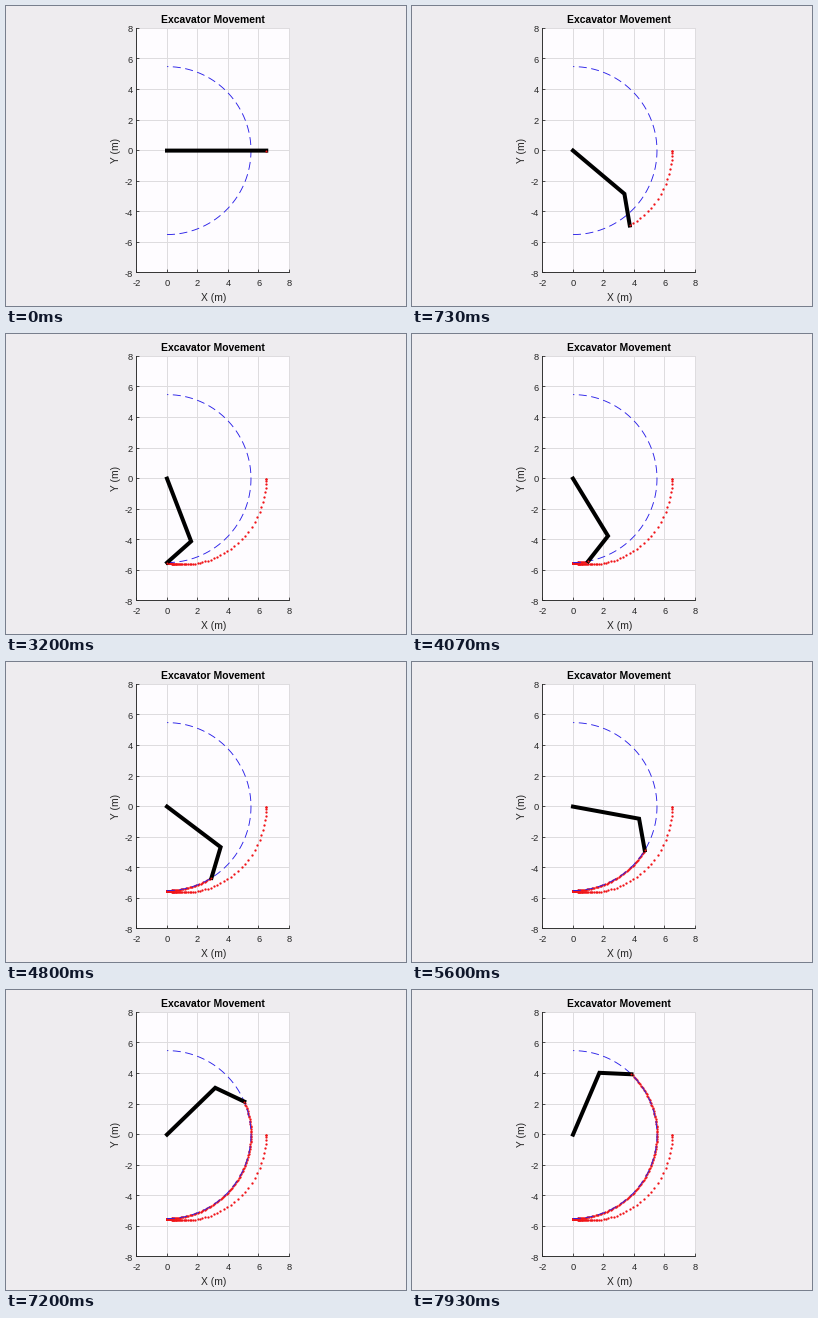
Write a matplotlib script that moves like this. It is 400 px wide and 300 px high and loops after 8000 ms.

```python
import numpy as np
import matplotlib.pyplot as plt
from matplotlib.animation import FuncAnimation

W, H, DPI = 400, 300, 100
FRAMES, LOOP_MS = 120, 8000
PT = 72 / DPI                       # points per pixel
SCALE, OX, OY = 15.27, 161, 144.6   # pixels per metre, origin on stage

BOOM, STICK, RADIUS = 4.4, 2.1, 5.5
RATE = 0.195                        # critically damped response, per frame
TRACE = 48                          # start of the arc, in frames
TURN = np.radians(2.275)            # arc speed, per frame
INK, GRID = "#262626", "#dedcdf"

# Joint angles that put the tip at the lower end of the arc
BEND = -np.arccos((RADIUS**2 - BOOM**2 - STICK**2) / (2 * BOOM * STICK))
LEAD = np.arctan2(-STICK * np.sin(BEND), BOOM + STICK * np.cos(BEND))
LOW = -np.pi / 2 + LEAD


def px(x, y):
    return OX + SCALE * np.asarray(x), OY - SCALE * np.asarray(y)


def crisp(x, y):
    """Like px, but on pixel centres."""
    return [np.floor(v) + 0.5 for v in px(x, y)]


def step(t):
    x = RATE * np.maximum(t, 0)
    return 1 - (1 + x) * np.exp(-x)


def ramp(t):
    x = RATE * np.maximum(t, 0)
    return (x - 2 + (2 + x) * np.exp(-x)) / RATE


def pose(t):
    """Elbow and tip position in metres at time t (in frames)."""
    s = step(t)
    a = LOW * s + TURN * ramp(t - TRACE)
    b = a + BEND * s
    ex, ey = BOOM * np.cos(a), BOOM * np.sin(a)
    return ex, ey, ex + STICK * np.cos(b), ey + STICK * np.sin(b)


fig = plt.figure(figsize=(W / DPI, H / DPI), dpi=DPI, facecolor="#eeecef")
ax = fig.add_axes([0, 0, 1, 1])
ax.set_xlim(0, W)
ax.set_ylim(H, 0)
ax.axis("off")


def line(x, y, color, width, **kw):
    return ax.plot(x, y, color=color, lw=width * PT, snap=False, **kw)[0]


def label(x, y, text, size, **kw):
    kw = {"ha": "center", "va": "center", "color": INK, **kw}
    ax.text(x, y, text, fontsize=size * PT, family="Liberation Sans", **kw)


def draw_axes():
    left, top = crisp(-2, 8)
    right, bottom = crisp(8, -8)
    ax.fill([left, right, right, left], [top, top, bottom, bottom],
            color="#fefcff", lw=0)
    for v in range(-2, 9, 2):
        x = crisp(v, 0)[0]
        line([x, x], [top, bottom], GRID, 1)
        line([x, x], [bottom, bottom - 2.5], INK, 0.8)
        label(px(v, 0)[0], 278, str(v), 9.3)
    for v in range(-8, 9, 2):
        y = crisp(0, v)[1]
        line([left, right], [y, y], GRID, 1)
        line([left, left + 2.5], [y, y], INK, 0.8)
        label(126.5, px(0, v)[1] + 0.4, str(v), 9.3,
              ha="right", va="center_baseline")
    line([left, left, right], [top, bottom, bottom], INK, 0.9)
    label(207.3, 14, "Excavator Movement", 10.4, weight="bold", color="black")
    label(207.3, 292, "X (m)", 10.3)
    label(109.6, 144, "Y (m)", 10.3, rotation=90)


draw_axes()
arm = line([], [], "black", 4, solid_capstyle="projecting",
           solid_joinstyle="miter")
trail = line([], [], "#f01418", 0, ls="none", marker="o",
             ms=2.3 * PT, mew=0)
arc = np.linspace(-np.pi / 2, np.pi / 2, 200)
path = line(*px(RADIUS * np.cos(arc), RADIUS * np.sin(arc)), "#2a20e8", 0.9,
            dash_capstyle="butt", zorder=3)
path.set_linestyle((0, (8 / 0.9, 4.5 / 0.9)))
arm.set_zorder(4)
trail.set_zorder(2.5)
tip = line([], [], "#f01418", 0, ls="none", marker="o", ms=2 * PT, mew=0,
           zorder=5)


def update(i):
    ex, ey, tx, ty = pose(i)
    arm.set_data(*px([0, ex, tx], [0, ey, ty]))
    tip.set_data(*px([tx], [ty]))
    _, _, x, y = pose(np.arange(2 * i + 1) / 2)
    trail.set_data(*px(x, y))
    return arm, trail, tip


anim = FuncAnimation(fig, update, frames=FRAMES, interval=LOOP_MS / FRAMES,
                     init_func=lambda: update(0), repeat=True, repeat_delay=0)
plt.show()
```
